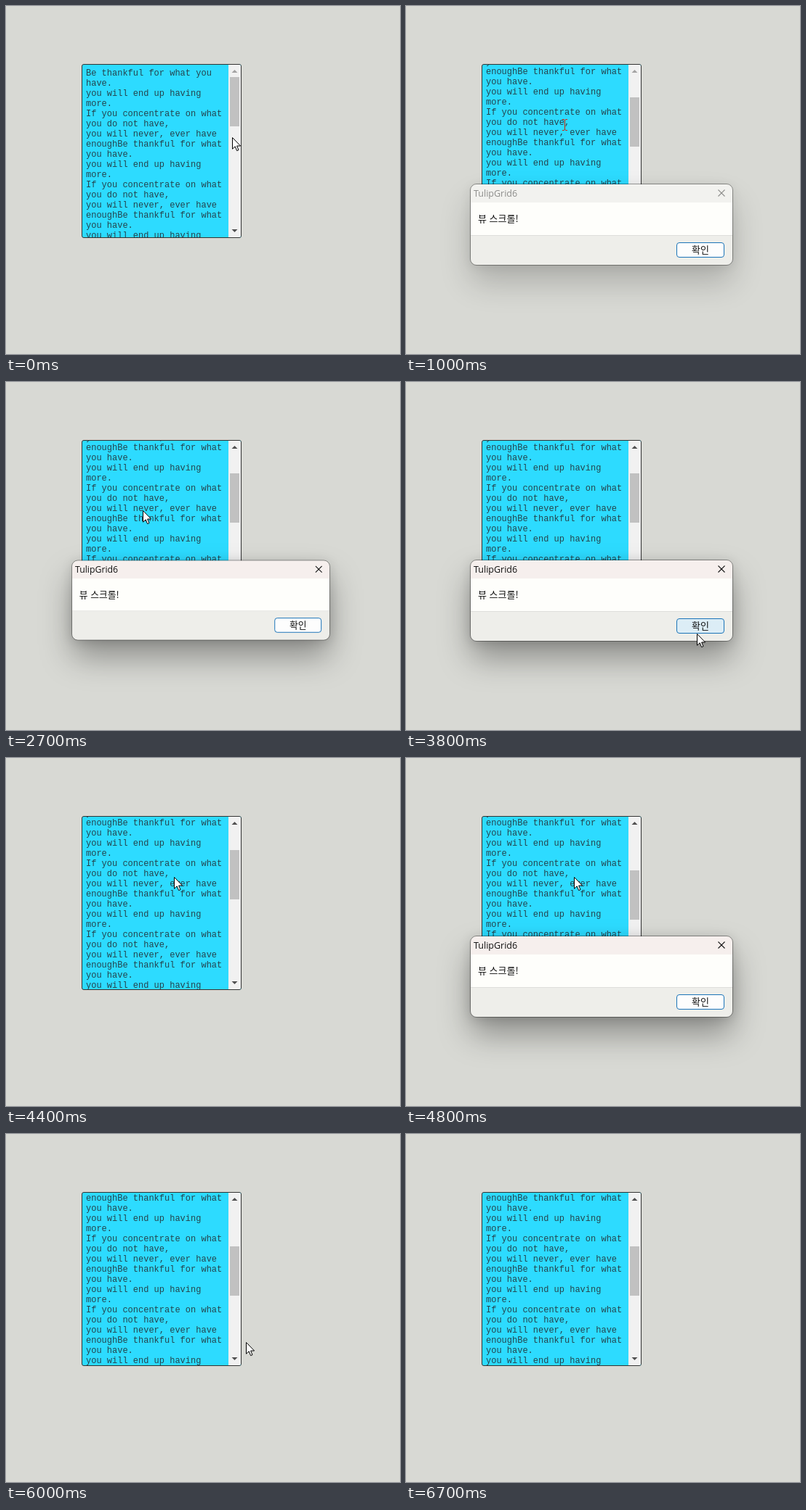
Animation of 542 by 480 pixels, one loop 6800 ms. Source, as an HTML page:

```html
<!DOCTYPE html>
<html lang="ko">
<head>
<meta charset="utf-8">
<title>Scroll alert</title>
<style>
  html, body { margin: 0; width: 100%; height: 100%; overflow: hidden; background: #d8d9d4; }
  #stage { position: relative; width: 542px; height: 480px; overflow: hidden; }
  #stage div, #stage svg { position: absolute; box-sizing: border-box; }
  #area {
    left: 104px; top: 80px; width: 220px; height: 240px; overflow: hidden;
    border: 1px solid #333; border-radius: 3px; background: #2ddbff;
  }
  #text {
    left: 5px; top: 5px; white-space: pre; color: #25444e;
    font: 12px/14px "Liberation Mono", "Courier New", monospace;
  }
  #bar { left: 201px; top: 0; width: 17px; height: 238px; background: #f1f1f1; }
  #thumb { left: 2px; top: 17px; width: 13px; height: 68px; background: #c1c1c1; }
  #bar svg { left: 0; top: 0; }
  #dialog {
    left: 89px; top: 246px; width: 360px; height: 111px;
    border-radius: 8px; background: #fefefb; transform-origin: 120px 28px;
    box-shadow: 0 24px 44px rgba(0,0,0,.35), 0 2px 16px rgba(0,0,0,.15);
    font: 13px/20px "Noto Sans CJK KR", "Noto Sans CJK", sans-serif; color: #111;
  }
  #title {
    left: 0; top: 0; width: 360px; height: 25px; padding-left: 4px;
    border-radius: 8px 8px 0 0; background: #f6efed;
    font: 12.5px/25px "Open Sans", "Noto Sans", sans-serif;
  }
  #title svg { left: 340px; top: 7px; }
  #label { left: 10px; top: 37px; white-space: nowrap; }
  #foot {
    left: 0; top: 70px; width: 360px; height: 41px;
    border-top: 1px solid #dededb; border-radius: 0 0 8px 8px; background: #eeeeea;
  }
  #ok {
    left: 283px; top: 80px; width: 66px; height: 21px; text-align: center; line-height: 17px;
    border: 1px solid #1b74b8; border-radius: 4px; background: #fdfdfd;
  }
  #rim { inset: -1px; border: 1px solid rgba(0,0,0,.36); border-radius: 9px; }
  #dialog.idle { box-shadow: 0 24px 44px rgba(0,0,0,.2), 0 2px 16px rgba(0,0,0,.08); }
  .idle #title { background: #f2f2ef; color: #8d8d8b; }
  .hover #ok { background: #dcedf6; }
  #arrow, #beam { left: 0; top: 0; overflow: visible; }
</style>
</head>
<body>
<div id="stage">
  <div id="area">
    <div id="text"></div>
    <div id="bar">
      <div id="thumb"></div>
      <svg width="17" height="238">
        <path id="up" d="M4.5 11 L8.5 7 L12.5 11Z"/>
        <path d="M4.5 227 L8.5 231 L12.5 227Z" fill="#505050"/>
      </svg>
    </div>
  </div>
  <div id="dialog">
    <div id="title">TulipGrid6
      <svg width="10" height="10" fill="none" stroke="currentColor" stroke-width="1.1"><path d="M.5 .5 L9.5 9.5 M9.5 .5 L.5 9.5"/></svg>
    </div>
    <div id="label">뷰 스크롤!</div>
    <div id="foot"></div>
    <div id="ok">확인</div>
    <div id="rim"></div>
  </div>
  <svg id="arrow" width="14" height="21">
    <path d="M.5 .5 V16.2 L4.2 12.8 L6.6 18.6 L9 17.6 L6.6 12 H11.6Z" fill="#fff" stroke="#000"/>
  </svg>
  <svg id="beam" width="1" height="1">
    <path d="M-3 -7.5 H-1 L.5 -6.5 L2 -7.5 H4 M.5 -6.5 V6.5 M-3 7.5 H-1 L.5 6.5 L2 7.5 H4" fill="none" stroke="#d22400"/>
  </svg>
</div>
<script>
  const LOOP = 6800, STEP = 100;
  const $ = id => document.getElementById(id);

  const verse = "Be thankful for what you have.\nyou will end up having\nmore.\n" +
    "If you concentrate on what\nyou do not have,\nyou will never, ever have\nenough";

  // Greedy wrap at 26 columns, the width of the text box.
  function wrap(text) {
    return text.split("\n").map(row => {
      let out = "", len = 0;
      for (const word of row.split(" ")) {
        if (len && len + 1 + word.length > 26) { out += "\n"; len = 0; }
        else if (len) { out += " "; len++; }
        out += word;
        len += word.length;
      }
      return out;
    }).join("\n");
  }
  $("text").textContent = wrap(verse.repeat(7));

  // Rows are [time, ...values].
  const pointer = [
    [0, 311, 181], [600, 218, 164], [1700, 218, 164], [2100, 392, 329], [2300, 392, 329],
    [2700, 188, 177], [2900, 188, 177], [3500, 400, 347], [4000, 400, 347], [4400, 231, 164],
    [4900, 231, 164], [5500, 384, 340], [5800, 384, 340], [6300, 230, 190]
  ];
  const scroll = [
    [600, 0], [700, 1], [800, 30], [900, 82], [1000, 100], [4300, 100],
    [4400, 101], [4500, 132], [4600, 180], [4700, 198], [5000, 200]
  ];
  const alerts = [[800, 2300], [2600, 3900], [4500, 5600]];
  const hovers = [[2100, 2300], [3400, 3900], [5400, 5600]];

  const smooth = u => u * u * (3 - 2 * u);
  const within = (t, spans) => spans.some(([a, b]) => t >= a && t < b);

  function sample(rows, t, ease = u => u) {
    const i = rows.findIndex(r => r[0] > t);
    if (i < 0) return rows[rows.length - 1].slice(1);
    if (i === 0) return rows[0].slice(1);
    const a = rows[i - 1], b = rows[i], u = ease((t - a[0]) / (b[0] - a[0]));
    return a.slice(1).map((v, k) => v + (b[k + 1] - v) * u);
  }

  // Scale and opacity of an alert that opens at a and starts closing at b.
  const pose = (t, a, b) => sample([
    [a - 100, .93, 0], [a, .95, .5], [a + 100, .983, 1], [a + 200, 1, 1],
    [b - 100, 1, 1], [b, .967, 1], [b + 100, .93, .4], [b + 200, .92, 0]
  ], t);

  function draw(t) {
    const [top] = sample(scroll, t);
    $("text").style.transform = `translateY(${-Math.round(top)}px)`;
    $("thumb").style.transform = `translateY(${Math.floor(top * 135.6 / 472)}px)`;
    $("up").setAttribute("fill", t < 2400 ? "#a3a3a3" : "#505050");

    const open = alerts.find(([a, b]) => t >= a && t < b + 200);
    const [scale, alpha] = open ? pose(t, ...open) : [1, 0];
    const box = $("dialog");
    box.style.transform = scale === 1 ? "none" : `scale(${scale})`;
    box.style.opacity = alpha;
    box.style.visibility = alpha ? "visible" : "hidden";
    box.classList.toggle("idle", t < 2200);
    box.classList.toggle("hover", within(t, hovers));

    const [x, y] = sample(pointer, t, smooth).map(Math.round);
    const beam = t >= 200 && t < 1800;
    for (const id of ["arrow", "beam"]) {
      const shown = t < 6400 && beam === (id === "beam");
      $(id).style.display = shown ? "block" : "none";
      $(id).style.transform = `translate(${x}px, ${y}px)`;
    }
  }

  const start = performance.now();
  function tick() {
    const t = (performance.now() - start) % LOOP;
    draw(Math.floor(t / STEP) * STEP);
    requestAnimationFrame(tick);
  }
  tick();
</script>
</body>
</html>
```
